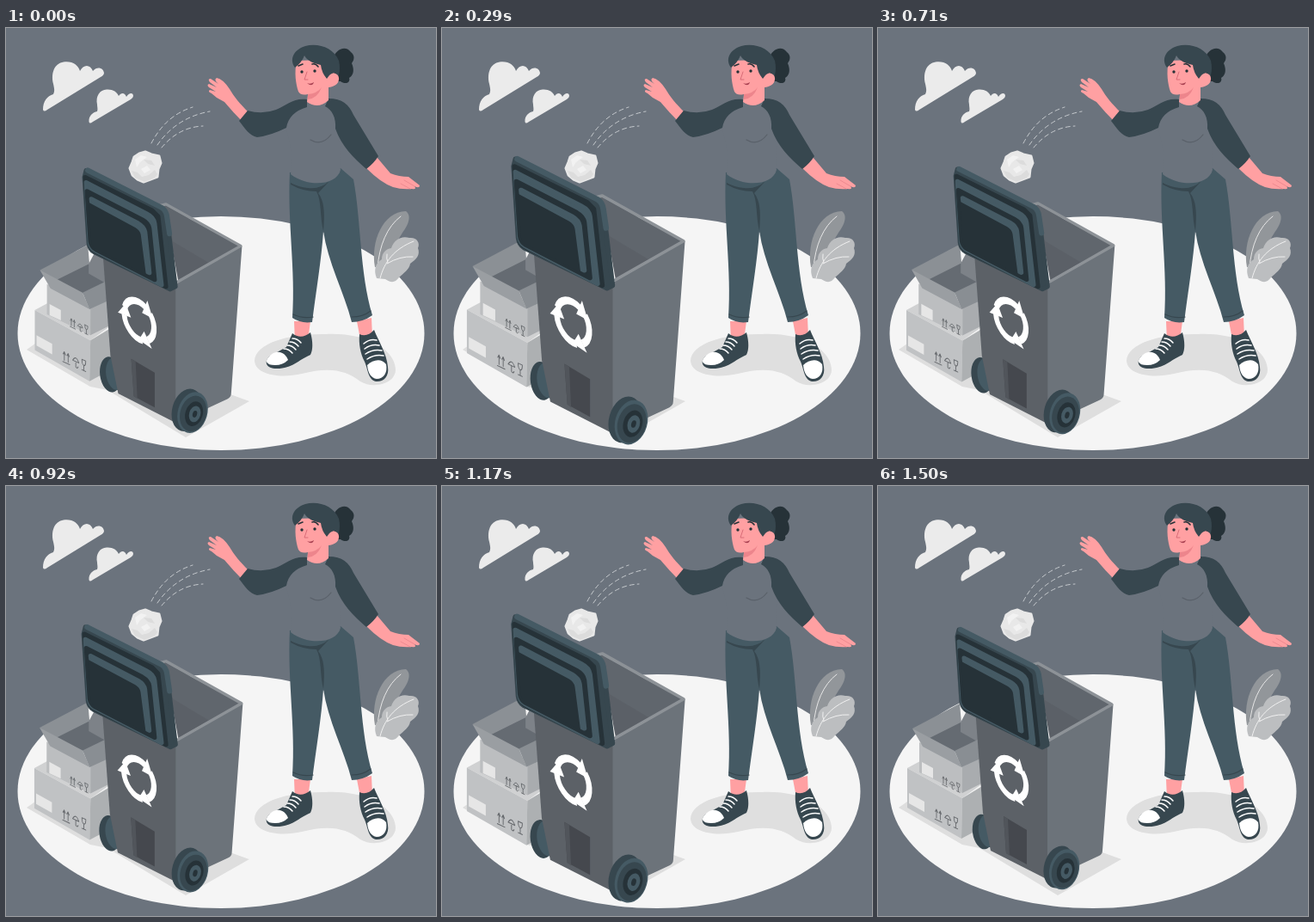
Recreate the animation shown at these times as an HTML page. Size 500 by 500 pixels, loop 1.54 s.

```html
<!DOCTYPE html>
<html lang="en">
<head>
<meta charset="utf-8">
<title>Recycling</title>
<style>
  html, body { margin: 0; width: 100%; height: 100%; overflow: hidden; background: #6b737d; }
  svg { display: block; width: 100vw; height: 100vh; }
  .line { fill: none; stroke-linecap: round; stroke-linejoin: round; }
  .round { stroke-width: 5; stroke-linejoin: round; }
  .skin { fill: #ffa0a2; }
  .dark { fill: #263238; }
  .navy { fill: #37474f; }
  .teal { fill: #455a64; }
  .white { fill: #fff; }
</style>
</head>
<body>
<svg viewBox="0 0 500 500">
  <defs>
    <g id="arrow" class="white">
      <path fill="none" stroke="#fff" stroke-width="7" d="M-19-6A20 20 0 0 1 8-18"/>
      <path d="M11-26L4-10L18-10Z"/>
    </g>
    <g id="marks" class="line" stroke="#66696d" stroke-width="1">
      <path d="M0 10V0L-1.5 3M0 0L1.5 3M5 10V0L3.500 3M5 0L6.500 3M-2 12H7"/>
      <path d="M11 5Q15-3 19 5ZM15 5V11Q17 13 18 10"/>
      <path d="M23-1H28Q28 5 25.500 5T23-1M25.500 5V11M23 11H28"/>
    </g>
  </defs>

  <ellipse cx="250" cy="355" rx="236.500" ry="136" fill="#f5f5f5"/>

  <g id="clouds" fill="#ebebeb">
    <path d="M43 95C43 85 48 79 55 77C57 73 56 70 55 65C52 53 56 41 67 39.500C77 38 84 43 86 50C90 42 98 42 101 50C106 44 113 46 114 52Q114 55 110 57L48 95Q44 98 43 95Z"/>
    <path d="M96.500 109C96 102 101 98 106 97C107 94 106 92 106 89C104 79 109 72 117 71.500C124 71 129 74 131 79C134 75 138 75 140 80C143 75 148 75 148 79Q148 81 145 83L101 109Q97 112 96.500 109Z"/>
  </g>

  <g class="line" stroke="#d0d3d6" stroke-width=".9" stroke-dasharray="5 4">
    <path d="M169 134C180 113 195 99 217 92"/>
    <path d="M176 136C189 117 209 102 237 97"/>
    <path d="M181 139C192 126 207 115 229 114"/>
  </g>

  <g id="ball">
    <path fill="#e8e8e8" stroke="#e8e8e8" stroke-width="3" stroke-linejoin="round" d="M149 150L155 146L162 144L169 147L178 149L180 157L177 164L176 173L168 176L160 179L153 176L147 171L144 163L147 156Z"/>
    <path fill="#dcdcdc" d="M146 166L153 168L158 173L166 171L173 165L176 170L173 174L161 179L150 174ZM160 153L169 154L173 160L165 158Z"/>
    <path fill="#f2f2f2" d="M150 153L157 148L164 150L156 156L152 162ZM157 164L164 160L168 165L161 169Z"/>
  </g>

  <g id="plant">
    <path fill="#92969a" d="M429 278C424 248 438 214 465 213C472 218 468 229 461 238L436 279Z"/>
    <path class="line" stroke="#e6e6e6" stroke-width="1" d="M432 279C434 253 443 231 459 219"/>
    <path fill="#bcbec0" d="M431 291C427 281 430 273 437 269C437 261 442 257 448 256C451 246 460 241 469 244C477 243 482 249 479 256C482 264 477 269 470 274C469 281 462 285 457 290C452 297 447 296 441 292Z"/>
    <path class="line" stroke="#f1f1f1" stroke-width="1" d="M435 291C440 272 451 257 474 248M444 273Q442 268 443 263M443 274Q458 265 473 266"/>
  </g>

  <path fill="#dfdfdf" d="M289 387C290 366 330 355 372 356C420 354 452 374 453 397C453 414 427 420 412 411C395 397 374 394 344 402C318 408 290 403 289 387Z"/>

  <g id="woman">
    <path class="dark" d="M380 37C382 25 395 19 401 28C407 33 404 38 402 41C406 50 403 56 399 58C401 64 394 66 389 62L378 62Z"/>
    <path class="skin" d="M335 341H354L351 363L336 365ZM408 341L425 337L426 360L412 362Z"/>
    <g id="shoes">
      <path class="navy" d="M333 355Q343 363 354 354C357 365 357 374 354 380C340 386 333 396 315 396C302 396 300 388 306 382L326 371Z"/>
      <path class="white" d="M307 381C315 373 325 377 328 386Q322 392 313 392C302 392 300 387 307 381Z"/>
      <path class="line" stroke="#fff" stroke-width="1.500" d="M323 373Q329 373 333 378M327 369Q333 369 337 374M330 365Q336 365 340 370M333 361Q339 361 343 366"/>
      <path class="navy" d="M411 356Q420 360 428 351C433 364 443 379 444 394C446 406 438 412 430 411C421 409 421 397 417 388C412 379 410 367 411 356Z"/>
      <path class="white" d="M420 392C427 385 437 384 442 391C444 401 439 408 431 408C424 407 421 401 420 392Z"/>
      <path class="line" stroke="#fff" stroke-width="1.500" d="M416 367Q423 361 431 363M417 373Q425 367 434 369M418 379Q427 373 437 375M420 385Q429 379 439 381"/>
    </g>
    <path class="teal" d="M330 168C327 226 337 281 333 337Q343 344 356 342C360 309 367 268 369 236C374 272 393 307 402 342Q415 342 426 334C411 284 413 224 404 176L389 163Z"/>
    <path class="line" stroke="#37474f" stroke-width="1.200" d="M334 333Q344 338 357 336M402 336Q415 336 424 329"/>
    <path class="navy" d="M331 182Q345 190 361 190C367 200 365 220 369 236C371 215 370 201 363 192L376 178Q365 188 351 186Q340 185 331 180Z"/>
    <path fill="#6b737d" d="M345 84H380L394 112C392 134 386 145 389 165C384 184 350 185 331 170C334 151 331 134 325 116Z"/>
    <path class="line" stroke="#596069" stroke-width="1.200" d="M354 130Q367 138 378 124"/>

    <path class="skin" d="M281 97C273 89 265 80 260 71Q252 59 245 58Q241 60 247 65L238 59Q234 59 237 63L245 69L236 65Q233 66 236 69L244 74L237 72Q234 74 239 76L245 81L254 86Q264 98 275 109Z"/>
    <path class="navy" d="M350 83C334 81 326 90 314 95Q298 101 281 96L271 108C278 117 283 125 292 127Q308 125 326 116Q329 98 350 92Z"/>
    <path class="skin" d="M431 150L447 169Q457 173 468 173L481 183Q481 187 475 184Q478 188 472 187Q460 188 450 185Q436 180 419 163Z"/>
    <path class="line" stroke="#e9858c" stroke-width=".8" d="M463 177L475 184M459 181L470 187"/>
    <path class="navy" d="M375 82C391 82 399 89 404 101L433 149Q428 157 419 164C404 151 390 137 383 117C384 104 379 95 371 91Z"/>

    <path class="skin" d="M338 38C335 52 337 65 340 74Q343 79 351 77L350 86Q363 95 375 84L375 69C387 68 390 56 381 52L373 37Z"/>
    <path fill="#ed858c" d="M351 77Q362 76 367 69Q362 82 351 83Z"/>
    <path class="navy" d="M336 46C328 35 337 24 348 21C363 17 381 23 387 38C390 51 386 59 381 66C389 56 384 48 376 55L373 59Q367 52 366 43C355 41 349 36 347 32Q344 40 336 46Z"/>
    <path class="skin" d="M376 58C378 50 388 52 387 60C386 67 379 69 375 66Z"/>
    <circle class="dark" cx="344" cy="51" r="1.700"/>
    <circle class="dark" cx="359" cy="50" r="1.700"/>
    <path class="line" stroke="#263238" stroke-width="1.600" d="M340 44L345 42M356 42Q360 41 363 45"/>
    <path class="line" stroke="#d96d78" stroke-width="1" d="M350 51L347 60L351 60"/>
    <path fill="#a73f50" d="M350 64Q354 66 358 63Q356 69 350 64Z"/>
  </g>

  <path fill="#dedede" d="M24 374L55 352L283 434L209 476L118 421L98 417Z"/>

  <g id="boxes">
    <path fill="#d0d1d2" d="M34 328L75 306L130 340L98 363Z"/>
    <path fill="#c0c2c4" d="M34 328L98 363L97 410L34 374Z"/>
    <path fill="#adb0b2" d="M98 363L136 340V389L97 410Z"/>
    <path fill="#bcbec0" d="M48 298L98 326V357L48 333Z"/>
    <path fill="#a9acaf" d="M98 326L136 308V338L98 357Z"/>
    <path fill="#8b9095" d="M40 282L95 253L97 276L60 295Z"/>
    <path fill="#656b72" d="M58 294L96 275L124 291L98 313Z"/>
    <path fill="#7d8288" d="M96 275L104 260L132 276L124 291L119 299L96 286Z"/>
    <path fill="#9a9ea2" d="M40 282L89 308L97 327L52 303Z"/>
    <path fill="#898e93" d="M89 308L124 291L130 312L97 327Z"/>
    <path fill="#e6e6e6" d="M51 321L64 328V340L51 334ZM36 357L54 367V379L36 369Z"/>
    <use href="#marks" transform="matrix(.68 .34 0 .8 76 338)"/>
    <use href="#marks" transform="matrix(.88 .42 0 1 68 376)"/>
  </g>

  <g id="bin">
    <g id="back-wheel" transform="rotate(-8 122 402)">
      <ellipse class="navy" cx="122" cy="402" rx="12" ry="20.500"/>
      <ellipse class="teal" cx="128" cy="402" rx="11" ry="19"/>
    </g>
    <path fill="#5c6167" d="M113 258L198 298V458L131 424L122 380Z"/>
    <path fill="#6c737a" d="M197 298L273.500 254L261 424Q261 428 257 430L197 458Z"/>
    <path fill="#5b6067" d="M184 207L270 254L200 294Z"/>
    <path fill="#60666d" d="M184 207L270 254L236 274L194 249Z"/>
    <path class="line" stroke="#8d9297" stroke-width="3.200" d="M178 208L186 206L272 254L200 295"/>
    <path fill="#45484e" d="M146 384L173 400V440L149 427Z"/>
    <path fill="#51555b" d="M146 384L151 387L153 430L149 427Z"/>
    <g transform="matrix(.87 .47 0 1.080 155 340)">
      <use href="#arrow"/>
      <use href="#arrow" transform="rotate(120)"/>
      <use href="#arrow" transform="rotate(240)"/>
    </g>
    <g id="lid">
      <path class="navy round" stroke="#37474f" d="M94 167L181 211Q186 214 187 220L197 301L191 304L103 261Q98 258 97 251L92 175Z"/>
      <path class="line" stroke="#455a64" stroke-width="6" d="M96 167L181 210Q186 213 187 220L190 240"/>
      <path class="dark round" stroke="#263238" d="M93 175L170 213L177 220L186 301L104 260Q99 257 98 251Z"/>
      <path class="teal round" stroke="#455a64" d="M94 181L164 217Q172 221 173 228L181 299L104 259Q99 256 98 250Z"/>
      <path class="dark round" stroke="#263238" d="M95 191L159 224Q166 228 167 234L173 293L105 258Q100 255 99 249Z"/>
      <path class="teal round" stroke="#455a64" d="M100 200L154 228Q161 232 162 238L167 285L106 254Z"/>
      <path class="dark" d="M97 204L151 233Q156 236 157 241L163 287L105 257Q101 255 100 250Z"/>
    </g>
    <g id="wheel" transform="rotate(16 214 444)">
      <ellipse class="navy" cx="210" cy="444" rx="17" ry="25"/>
      <ellipse class="teal" cx="217" cy="445" rx="17" ry="24"/>
      <ellipse class="navy" cx="218" cy="446" rx="15" ry="21"/>
      <ellipse class="dark" cx="219" cy="446" rx="10" ry="14.500"/>
      <ellipse class="teal" cx="220" cy="446" rx="6.500" ry="9.500"/>
      <ellipse class="dark" cx="220" cy="446" rx="2.500" ry="4"/>
    </g>
  </g>
</svg>
<script>
  const LOOP = 1540;
  // Pulse curve: time in ms, growth over the resting size.
  const beat = [
    [0, .01], [170, .07], [315, .1], [460, .07], [710, .02], [815, 0],
    [920, .02], [1170, .1], [1500, 0], [1540, .01]
  ];
  const pivots = { bin: [182, 317], boxes: [85, 333] };

  // Tangent is flat at peaks and valleys so the curve never overshoots.
  function slope(i) {
    const last = beat.length - 1;
    const [t, v] = beat[i];
    const [t0, v0] = i ? beat[i - 1] : [beat[last - 1][0] - LOOP, beat[last - 1][1]];
    const [t1, v1] = i < last ? beat[i + 1] : [beat[1][0] + LOOP, beat[1][1]];
    return (v - v0) * (v1 - v) <= 0 ? 0 : (v1 - v0) / (t1 - t0);
  }

  function growth(time) {
    const i = beat.findIndex(([t]) => t > time);
    const [t0, v0] = beat[i - 1], [t1, v1] = beat[i];
    const span = t1 - t0, u = (time - t0) / span, w = 1 - u;
    return w * w * (1 + 2 * u) * v0 + u * u * (3 - 2 * u) * v1
      + span * u * w * (w * slope(i - 1) - u * slope(i));
  }

  function draw(now) {
    const scale = 1 + growth(now % LOOP);
    for (const [id, [x, y]] of Object.entries(pivots)) {
      document.getElementById(id).setAttribute('transform',
        `translate(${x} ${y}) scale(${scale}) translate(${-x} ${-y})`);
    }
  }

  const start = performance.now();
  function tick() {
    draw(performance.now() - start);
    requestAnimationFrame(tick);
  }
  tick();
</script>
</body>
</html>
```
